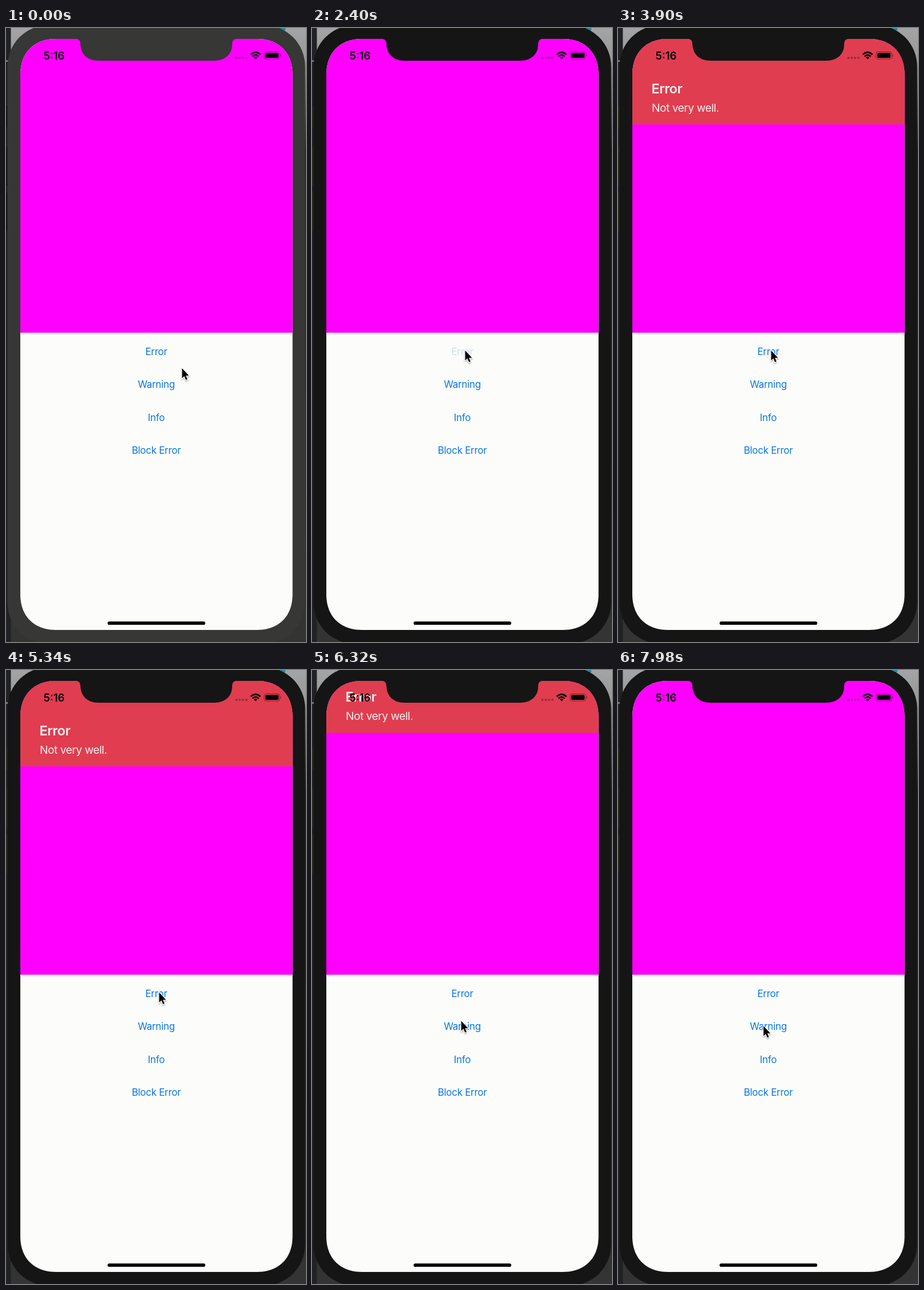
Animation, 524 px wide and 1070 px high, one loop 8000 ms. Source, as an HTML page:

```html
<!DOCTYPE html>
<html lang="en">
<head>
<meta charset="utf-8">
<title>Banner demo</title>
<style>
  html, body { margin: 0; width: 100%; height: 100%; overflow: hidden; background: #222; }
  svg { display: block; width: 100vw; height: 100vh; }
  text { font-family: Inter, Roboto, sans-serif; }
  .button { font-size: 17px; letter-spacing: -.3px; fill: #0a76e6; text-anchor: middle; }
  .title { font-size: 23.5px; font-weight: 600; letter-spacing: -.5px; }
  .message { font-size: 19.2px; letter-spacing: -.5px; }
  .clock { font-size: 18.5px; font-weight: 600; text-anchor: middle; }
</style>
</head>
<body>
<svg viewBox="0 0 524 1070">
  <defs>
    <clipPath id="screen">
      <path d="M25 81C25 43 49 19 87 19H438.500C476.500 19 500.500 43 500.500 81V987C500.500 1025 476.500 1049 438.500 1049H87C49 1049 25 1025 25 987Z"/>
    </clipPath>
    <linearGradient id="wall" x2="0" y2="1">
      <stop offset="0" stop-color="#a3a4a6"/>
      <stop offset=".05" stop-color="#999"/>
      <stop offset=".2" stop-color="#25272d"/>
      <stop offset="1" stop-color="#343434"/>
    </linearGradient>
    <filter id="soft" x="-50%" y="-50%" width="200%" height="200%">
      <feDropShadow dx="0" dy="1.500" stdDeviation="1.200" flood-opacity=".4"/>
    </filter>
  </defs>

  <!-- desktop behind the phone -->
  <rect width="524" height="1070" fill="url(#wall)"/>
  <rect width="8.500" height="1070" fill="#202225"/>
  <rect y="56" width="4" height="3" fill="#777"/>
  <rect x="476" width="12" height="4" fill="#248b9b"/>
  <g id="keys">
    <rect y="135" width="4" height="38"/>
    <rect y="207" width="4" height="68"/>
    <rect y="287" width="4" height="67"/>
  </g>

  <rect class="bezel" x="2.500" y="-5" width="520" height="1078" rx="72"/>
  <g clip-path="url(#screen)">
    <rect y="19" width="524" height="1031" fill="#fcfdfb"/>
    <rect y="19" width="524" height="512" fill="#f0f"/>
    <g id="banner">
      <rect y="-60" width="524" height="228" fill="#e03d50"/>
      <g fill="#f8eeee">
        <text class="title" x="58.500" y="113.500">Error</text>
        <text class="message" x="59" y="145.500">Not very well.</text>
      </g>
    </g>
  </g>
  <path class="bezel" d="M118 18.500C127 18.500 130 21 130 29C131 46 143 57 161 57H364C382 57 395 46 395 29C395 21 398 18.500 407 18.500Z"/>

  <!-- status bar -->
  <text class="clock" x="84" y="54.500">5:16</text>
  <g fill-opacity=".3">
    <circle cx="402.500" cy="52" r="2"/><circle cx="408.300" cy="52" r="2"/>
    <circle cx="414" cy="52" r="2"/><circle cx="419.800" cy="52" r="2"/>
  </g>
  <g fill="none" stroke="#000" stroke-width="2.600">
    <path d="M427.500 46.300Q436 38.300 444.500 46.300M430.600 49.500Q436 44.500 441.400 49.500"/>
  </g>
  <path d="M432.800 51.300Q436 48.700 439.200 51.300L436 54.500Z"/>
  <rect x="451" y="41.500" width="27" height="12.500" rx="3.600" fill="none" stroke="#000" stroke-opacity=".45" stroke-width="1.100"/>
  <rect x="453" y="43.400" width="23" height="8.700" rx="2"/>
  <path d="M479.500 45.500Q482 47.700 479.500 50Z" fill-opacity=".45"/>

  <text class="button" id="error" x="262.500" y="569.500">Error</text>
  <text class="button" x="262.500" y="627">Warning</text>
  <text class="button" x="262.500" y="684.500">Info</text>
  <text class="button" x="262.500" y="742">Block Error</text>
  <rect x="177.500" y="1034.300" width="170.500" height="5.700" rx="2.850"/>

  <g id="cursor" filter="url(#soft)">
    <path d="M0 0V17.300L3.900 13.700L6.700 20.300L9.400 19.100L6.600 12.700H12Z" stroke="#fff" stroke-width="2" paint-order="stroke"/>
  </g>
</svg>
<script>
const LOOP = 8000, HIDDEN = -150;
const $ = id => document.getElementById(id);
const bezels = document.querySelectorAll('.bezel');

const clamp = x => Math.min(1, Math.max(0, x));
const progress = (t, from, to) => clamp((t - from) / (to - from));
const mix = (a, b, k) => a + (b - a) * k;
const smooth = k => k * k * (3 - 2 * k);

// Cubic ease-in: bezier(.42, 0, 1, 1), solved by bisection
function easeIn(x) {
  let lo = 0, hi = 1;
  for (let i = 0; i < 20; i++) {
    const s = (lo + hi) / 2;
    if (smooth(s) + 1.26 * s * (1 - s) ** 2 < x) lo = s; else hi = s;
  }
  return smooth(lo);
}
const easeOut = x => 1 - easeIn(1 - x);

// Pointer stops: time, x, y
const path = [
  [0, 307.5, 593], [150, 307.5, 593], [1200, 268, 563], [2000, 267.5, 562],
  [5350, 267.5, 562], [6140, 264.5, 606], [6560, 254.800, 620], [7200, 254.200, 620.500], [LOOP, 254.200, 620.500]
];

function pointer(t) {
  const i = path.findIndex(p => p[0] > t);
  const a = path[i - 1], b = path[i];
  const k = smooth(progress(t, a[0], b[0]));
  return [mix(a[1], b[1], k), mix(a[2], b[2], k)];
}

function bannerOffset(t) {
  return t < 5000
    ? mix(HIDDEN, 0, easeOut(progress(t, 2600, 3280)))
    : mix(0, HIDDEN, easeIn(progress(t, 5800, 6720)));
}

function draw(now) {
  const t = now % LOOP;
  const focused = t >= 2300;
  bezels.forEach(b => b.setAttribute('fill', focused ? '#151515' : '#373736'));
  $('keys').setAttribute('fill', focused ? '#292a22' : '#16171a');
  $('banner').setAttribute('transform', `translate(0 ${bannerOffset(t)})`);
  $('error').setAttribute('opacity', t < 2350 ? 1 : mix(.2, 1, progress(t, 2560, 3280)));
  $('cursor').setAttribute('transform', `translate(${pointer(t)})`);
  requestAnimationFrame(draw);
}
draw(performance.now());
</script>
</body>
</html>
```
